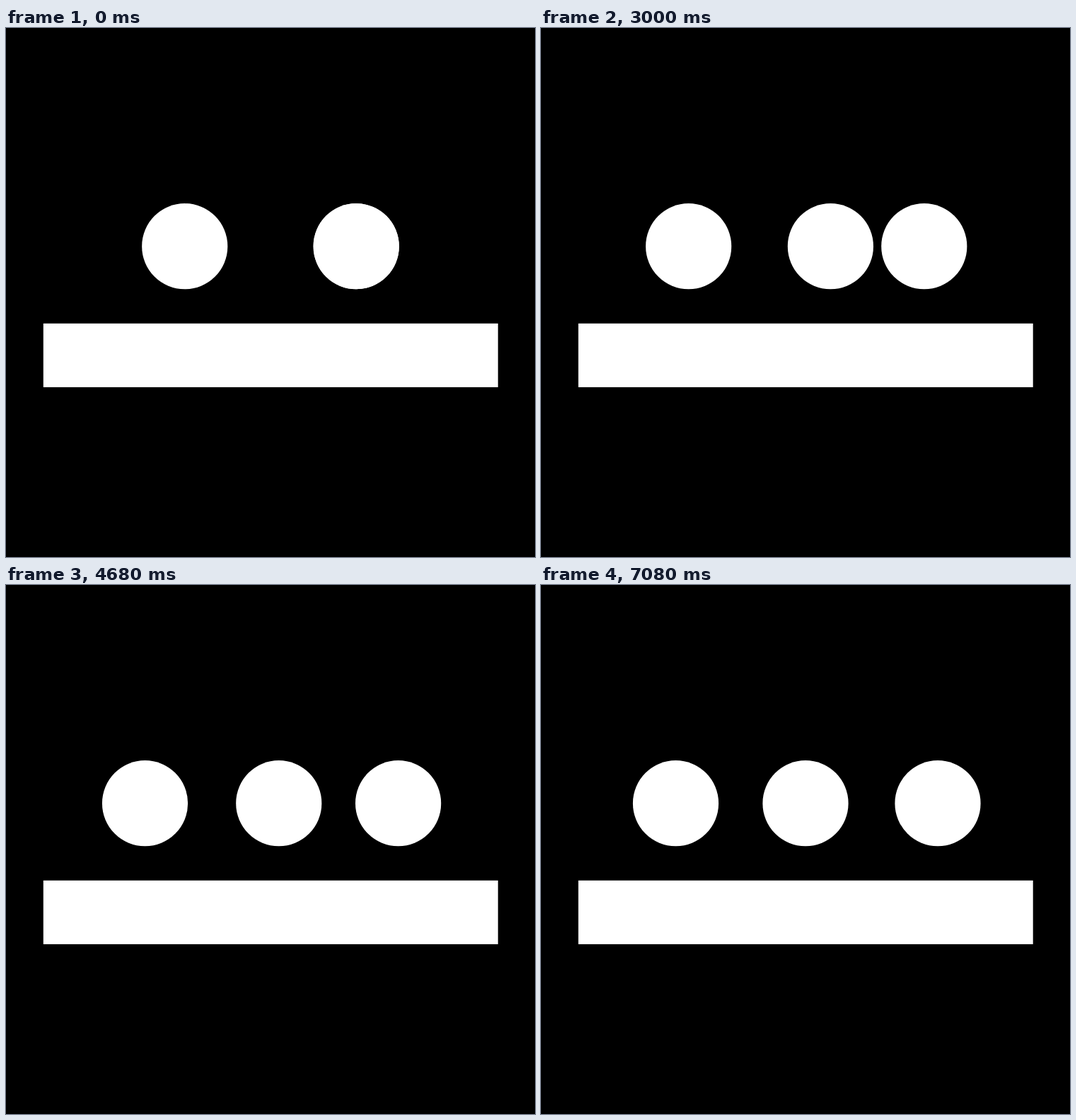
Write an HTML page that moves like this. It is 748 px wide and 748 px high and loops after 8.5 s.

```html
<!DOCTYPE html>
<html lang="en">
<head>
<meta charset="utf-8">
<title>Dots and bar</title>
<style>
  html, body { margin: 0; width: 100%; height: 100%; overflow: hidden; background: #000; }
  svg { display: block; width: 100%; height: 100%; fill: #fff; }
</style>
</head>
<body>
<svg viewBox="0 0 748 748">
  <circle cx="252.75" cy="308.7" r="60.6"/>
  <circle cx="495.2" cy="308.7" r="60.6"/>
  <circle cx="495.2" cy="308.7" r="60.6"/>
  <rect x="52.8" y="417.8" width="642.9" height="90.1"/>
</svg>
<script>
  const LOOP = 8500, DELAY = 1500, STEPS = 120;
  const dots = document.querySelectorAll('circle');
  const paths = [[252.75, 190.5], [495.2, 374], [495.2, 561]];

  // step, progress, slope against the square root of time
  const curve = [
    [0, 0, 1.1], [1, 0.107, 1.55], [19, 0.575, 1.27], [32, 0.708, 1.02],
    [56, 0.854, 0.75], [80, 0.94, 0.51], [STEPS, 1, 0]
  ];
  const root = step => Math.sqrt(step / STEPS);

  // Steps come in threes, held for 100, 20 and 20 ms.
  function stepAt(time) {
    const t = time - DELAY;
    if (t < 0) return 0;
    const rest = t % 140;
    const part = rest < 100 ? 1 : rest < 120 ? 2 : 3;
    return Math.min(STEPS, 3 * Math.floor(t / 140) + part);
  }

  function ease(step) {
    const k = curve.findIndex((knot, i) => i > 0 && step <= knot[0]);
    const [a, pa, ma] = curve[k - 1], [b, pb, mb] = curve[k];
    const h = root(b) - root(a);
    const s = (root(step) - root(a)) / h, r = 1 - s;
    return r * r * (1 + 2 * s) * pa + s * s * (3 - 2 * s) * pb
      + h * s * r * (r * ma - s * mb);
  }

  function draw(time) {
    const p = ease(stepAt(time));
    dots.forEach((dot, i) => {
      const [from, to] = paths[i];
      dot.setAttribute('cx', from + (to - from) * p);
    });
  }

  const start = performance.now();
  function tick(now) {
    draw(Math.max(0, now - start) % LOOP);
    requestAnimationFrame(tick);
  }
  draw(0);
  requestAnimationFrame(tick);
</script>
</body>
</html>
```
